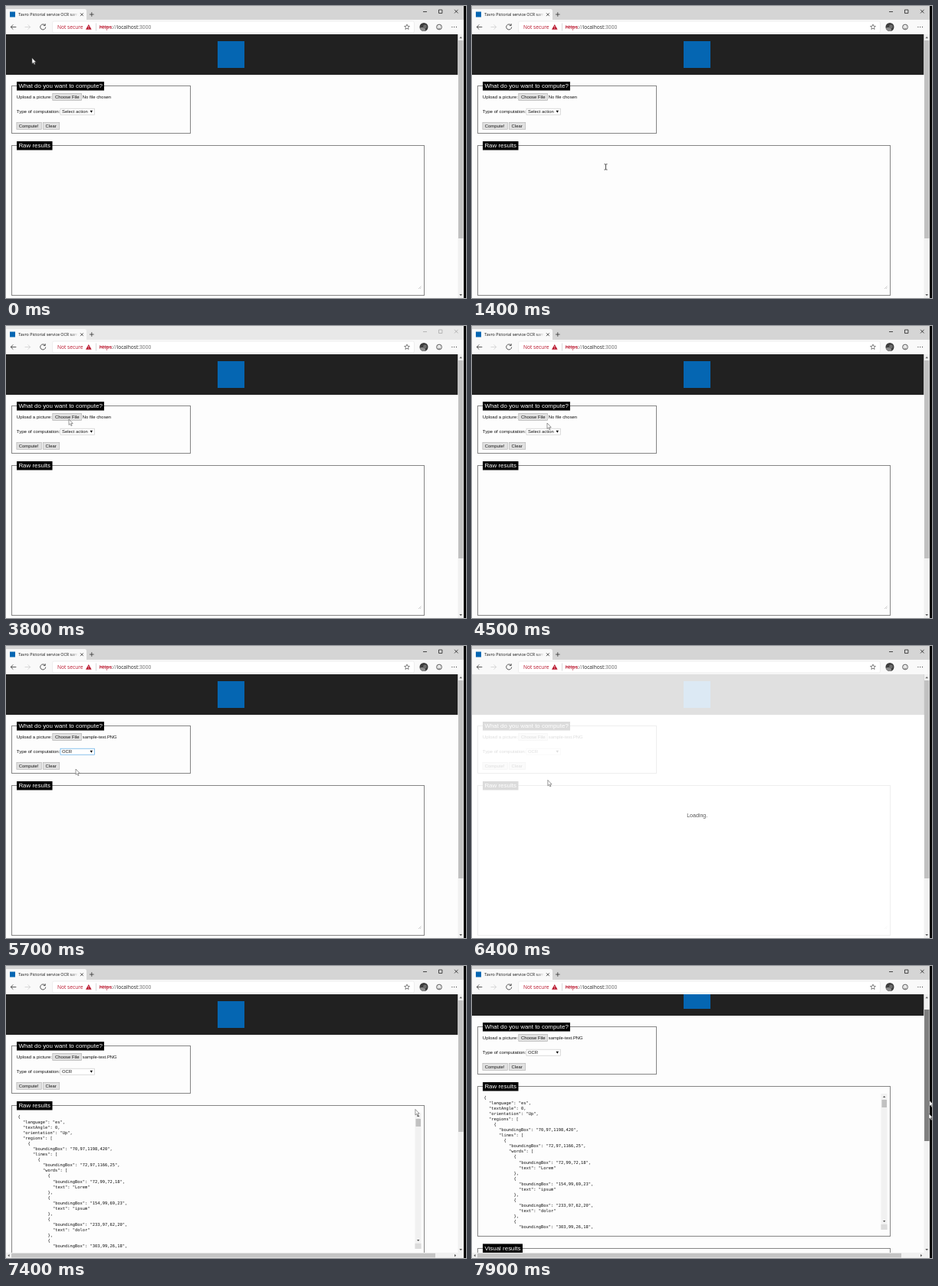
These frames come from a looping animation (600 by 382 pixels, 8 s). An HTML page:

```html
<!DOCTYPE html>
<html lang="en">
<head>
<meta charset="utf-8">
<title>OCR demo</title>
<style>
  html, body { margin: 0; width: 100%; height: 100%; overflow: hidden; background: #fdfdfd; }
  svg { display: block; width: 600px; height: 382px; }
  text { font: 6.1px "Liberation Sans", Arial, sans-serif; fill: #111; white-space: pre; }
  .ui { font-family: "Open Sans", "Noto Sans", sans-serif; font-size: 6.65px; }
  .legend { font-size: 7.95px; fill: #fff; }
  .small { font-size: 5.9px; }
  .code { font-family: "DejaVu Sans Mono", monospace; font-size: 5.4px; }
  .frame { fill: none; stroke: #858585; }
  .btn { fill: #e1e1e1; stroke: #b4b4b4; stroke-width: .7; }
  .line { fill: none; stroke: #333; stroke-width: .8; }
</style>
</head>
<body>
<svg viewBox="0 0 600 382" xmlns="http://www.w3.org/2000/svg">
  <defs>
    <clipPath id="view"><rect y="37" width="589.5" height="345"/></clipPath>
    <clipPath id="face"><circle cx="545" cy="27.5" r="5.5"/></clipPath>
    <linearGradient id="fade">
      <stop offset="0" stop-color="#f9f9f9" stop-opacity="0"/>
      <stop offset="1" stop-color="#f9f9f9"/>
    </linearGradient>
    <path id="arrow" d="M0 0V7.4L1.7 5.9L2.9 8.6L4.1 8.1L2.9 5.5H5.2Z" fill="#fff" stroke="#555" stroke-width=".6"/>
  </defs>
  <rect width="600" height="382" fill="#fdfdfd"/>

  <g clip-path="url(#view)">
    <g id="page">
      <rect y="37" width="590" height="53" fill="#212121"/>
      <rect x="276" y="46" width="35" height="35" fill="#0566b2"/>

      <rect class="frame" x="7.5" y="104.5" width="233" height="62"/>
      <rect x="14" y="99" width="114" height="11.5"/>
      <text class="legend" x="16.4" y="107.4">What do you want to compute?</text>
      <text x="13.8" y="121">Upload a picture:</text>
      <rect class="btn" x="60.8" y="114.4" width="37.6" height="9"/>
      <text class="small" x="64" y="121">Choose File</text>
      <text class="small" id="file" x="99.8" y="121">No file chosen</text>
      <text x="13.8" y="140.2">Type of computation:</text>
      <rect id="select" x="71" y="134.2" width="44.4" height="8" fill="#fff" stroke="#ccc" stroke-width=".7"/>
      <text class="small" id="choice" x="73" y="140.2">Select action</text>
      <path d="M109.6 136.8h3.4l-1.7 2.9z"/>
      <rect class="btn" x="13.9" y="152.3" width="32.4" height="9"/>
      <text class="small" x="16.8" y="158.9">Compute!</text>
      <rect class="btn" x="48.3" y="152.3" width="21.4" height="9"/>
      <text class="small" x="51.6" y="158.9">Clear</text>

      <rect class="frame" x="7.5" y="182.5" width="538" height="196"/>
      <rect x="14" y="177" width="46.5" height="11.5"/>
      <text class="legend" x="16.4" y="185.4">Raw results</text>
      <path d="M538 370l3.5-3.5M540 370l1.5-1.5" fill="none" stroke="#aaa" stroke-width=".6"/>

      <g id="results">
        <g id="json"></g>
        <rect x="533.5" y="192" width="8" height="178" fill="#f1f1f1"/>
        <rect x="534.5" y="200" width="6.5" height="10" fill="#c1c1c1"/>
        <path d="M536 197h3.4l-1.7-2z M536 358h3.4l-1.7 2z" fill="#505050"/>
        <rect x="533.5" y="363" width="8" height="7" fill="#dcdcdc"/>
        <rect class="frame" x="7.5" y="394.5" width="538" height="196"/>
        <rect x="14" y="388.5" width="52" height="11.5"/>
        <text class="legend" x="16.4" y="397">Visual results</text>
      </g>
    </g>
    <g id="loading">
      <rect y="37" width="590" height="345" fill="#fff" opacity=".86"/>
      <text id="dots" x="280.2" y="223.8" style="font-size:7.05px;fill:#555"></text>
    </g>
  </g>

  <rect x="589.5" y="37" width="7.5" height="345" fill="#f1f1f1"/>
  <rect id="thumb" x="590" y="45" width="6.5" height="259"/>
  <path d="M591.4 42.2h3.6l-1.8-2.2z" fill="#666"/>
  <path id="down" d="M591.4 377h3.6l-1.8 2.2z" fill="#555"/>
  <g id="hbar">
    <rect y="375" width="597" height="7" fill="#f1f1f1"/>
    <rect x="7" y="375.8" width="553" height="5.6" fill="#c4c4c4"/>
    <path d="M4.5 377v3.4l-2.2-1.7z M585 377v3.4l2.2-1.7z" fill="#555"/>
  </g>

  <rect id="bar" width="597" height="18" />
  <path d="M0 4H102.5Q105 4 105 6.5V18H0Z" fill="#f9f9f9"/>
  <rect x="5" y="7.5" width="7" height="7" fill="#0566b2"/>
  <text class="ui" x="16.3" y="13.2" style="font-size:5.35px">Tavro Pictorial service OCR sam</text>
  <rect x="84" y="6" width="10" height="10" fill="url(#fade)"/>
  <rect x="94" y="6" width="10" height="10" fill="#f9f9f9"/>
  <path class="line" d="M97 9.3l3.8 3.8m0-3.8l-3.8 3.8M109 11h5.6m-2.8-2.8v5.6"/>
  <path class="line" id="win" d="M544 7.5h5M564.5 5h4.4v4.4h-4.4zM585 4.8l4.6 4.6m0-4.6l-4.6 4.6"/>

  <rect y="18" width="597" height="19" fill="#f9f9f9"/>
  <rect x="60.5" y="20" width="472" height="15" rx="2" fill="#fff" stroke="#e8e8e8" stroke-width=".7"/>
  <path class="line" d="M13.3 27.5H6.2m3.1-3.1l-3.1 3.1l3.1 3.1"/>
  <path class="line" style="stroke:#d0d0d0" d="M24.5 27.5h7.1m-3.1-3.1l3.1 3.1l-3.1 3.1"/>
  <path class="line" d="M50.9 25.2A3.5 3.5 0 1 0 51.7 27.6M51.2 23.2v2.4h-2.4"/>
  <text class="ui" x="67" y="29.9" style="fill:#b9152c">Not secure</text>
  <path d="M107.8 24l3.8 6.7h-7.6z" fill="#b9152c"/>
  <path d="M107.8 26.2v2.2m0 .6v.8" stroke="#fff" stroke-width=".7"/>
  <path d="M117.5 22.5v10" stroke="#ccc" stroke-width=".7"/>
  <text class="ui" x="121.8" y="29.9" style="fill:#666"><tspan fill="#b9152c">https</tspan>://<tspan fill="#222">localhost</tspan>:3000</text>
  <path d="M121.8 27.7h16" stroke="#b9152c" stroke-width=".8"/>
  <path class="line" id="star" style="stroke-width:.6"/>
  <g clip-path="url(#face)">
    <rect x="539" y="21" width="12" height="13" fill="#3c3c3c"/>
    <ellipse cx="543" cy="31" rx="4" ry="3" fill="#8b8b8b"/>
    <circle cx="546.5" cy="27" r="2.4" fill="#6c6c6c"/>
  </g>
  <circle class="line" cx="565" cy="27.5" r="3.4"/>
  <path class="line" d="M563.3 28.6q1.7 1.8 3.4 0M563.7 26v.8m2.6-.8v.8" style="stroke-width:.6"/>
  <path d="M581.4 27.5h1m1.8 0h1m1.8 0h1" stroke="#333"/>
  <rect x="597" width="3" height="382"/>

  <use id="trail" href="#arrow" x="596.7" y="176"/>
  <g id="cursor">
    <use id="pointer" href="#arrow"/>
    <path id="beam" d="M-2-3.6h1.5L0-3.2L.5-3.6H2M0-3.2V3.2M-2 3.6h1.5L0 3.2L.5 3.6H2" fill="none" stroke="#222" stroke-width=".8"/>
  </g>
</svg>
<script>
const LOOP = 8000, STEP = 100;
const AWAY = [2500, 4200];
const FILE_AT = 4800, FOCUS_AT = 4900, PICK_AT = 5400, LOAD_AT = 6300, DONE_AT = 7300;
const $ = id => document.getElementById(id);
const show = (id, on) => $(id).setAttribute("display", on ? "inline" : "none");
const set = (id, attrs) => { for (const k in attrs) $(id).setAttribute(k, attrs[k]); };

// time, x, y of the mouse
const path = [
  [0, 34, 68], [400, 34, 68], [1100, 132, 168], [1400, 174.5, 210.5], [1600, 178, 222],
  [2000, 92, 124], [2400, 82, 122], [3900, 82, 122], [4500, 98, 127], [4900, 98, 138],
  [5400, 86, 150], [5700, 91, 161], [6000, 34, 156], [6300, 34, 156], [6700, 293.5, 233.5],
  [7000, 293.5, 233.5], [7500, 594, 176], [7600, 594.5, 176], [7900, 595.8, 193]
];

function mouse(t) {
  const i = path.findIndex(p => p[0] > t);
  if (i < 0) return path[path.length - 1].slice(1);
  const [t0, x0, y0] = path[i - 1], [t1, x1, y1] = path[i];
  const k = (t - t0) / (t1 - t0);
  return [x0 + (x1 - x0) * k, y0 + (y1 - y0) * k];
}

function buildJson() {
  const words = [["72,99,72,18", "Lorem"], ["154,99,69,23", "ipsum"], ["233,97,62,20", "dolor"], ["303,99,26,18"]];
  const lines = [
    [0, "{"], [2, '"language": "es",'], [2, '"textAngle": 0,'], [2, '"orientation": "Up",'],
    [2, '"regions": ['], [4, "{"], [6, '"boundingBox": "70,97,1198,420",'], [6, '"lines": ['],
    [8, "{"], [10, '"boundingBox": "72,97,1166,25",'], [10, '"words": [']
  ];
  for (const [box, word] of words) {
    lines.push([12, "{"], [14, `"boundingBox": "${box}",`]);
    if (word) lines.push([14, `"text": "${word}"`], [12, "},"]);
  }
  $("json").innerHTML = lines.map(([indent, s], i) =>
    `<text class="code" x="${15.4 + indent * 3.25}" y="${198.8 + i * 7.06}">${s}</text>`).join("");
}

function buildStar() {
  let d = "";
  for (let i = 0; i < 10; i++) {
    const r = i % 2 ? 1.6 : 3.6, a = (i * 36 - 90) * Math.PI / 180;
    d += (i ? "L" : "M") + (523 + r * Math.cos(a)).toFixed(2) + " " + (27.6 + r * Math.sin(a)).toFixed(2);
  }
  set("star", { d: d + "Z" });
}

function draw(t) {
  const away = t >= AWAY[0] && t < AWAY[1];
  set("bar", { fill: away ? "#e8e8e8" : "#d5d5d5" });
  $("win").style.stroke = away ? "#aaa" : "#222";

  $("file").textContent = t < FILE_AT ? "No file chosen" : "sample-text.PNG";
  $("choice").textContent = t < PICK_AT ? "Select action" : "OCR";
  set("select", { stroke: t >= FOCUS_AT && t < 6100 ? "#5aa9e6" : "#ccc" });

  show("loading", t >= LOAD_AT && t < DONE_AT);
  $("dots").textContent = "Loading" + ".".repeat(1 + Math.floor(Math.max(0, t - LOAD_AT) / 300) % 3);

  const done = t >= DONE_AT;
  const k = Math.min(1, Math.max(0, (t - 7600) / 300));
  show("results", done);
  show("hbar", done);
  set("page", { transform: `translate(0 ${-25 * k})` });
  set("thumb", { y: 45 + 12 * k, height: done ? 172 : 259, fill: t >= 7600 ? "#7f7f7f" : "#c1c1c1" });
  set("down", { transform: `translate(0 ${done ? -7 : 0})` });

  const [x, y] = mouse(t);
  const text = y > 192 && x < 535;
  set("cursor", { transform: `translate(${x} ${y})` });
  show("pointer", !text);
  show("beam", text);
  show("trail", t >= 7700);
}

buildJson();
buildStar();
const start = performance.now();
function tick() {
  const t = (performance.now() - start) % LOOP;
  draw(Math.floor(t / STEP) * STEP);
  requestAnimationFrame(tick);
}
tick();
</script>
</body>
</html>
```
